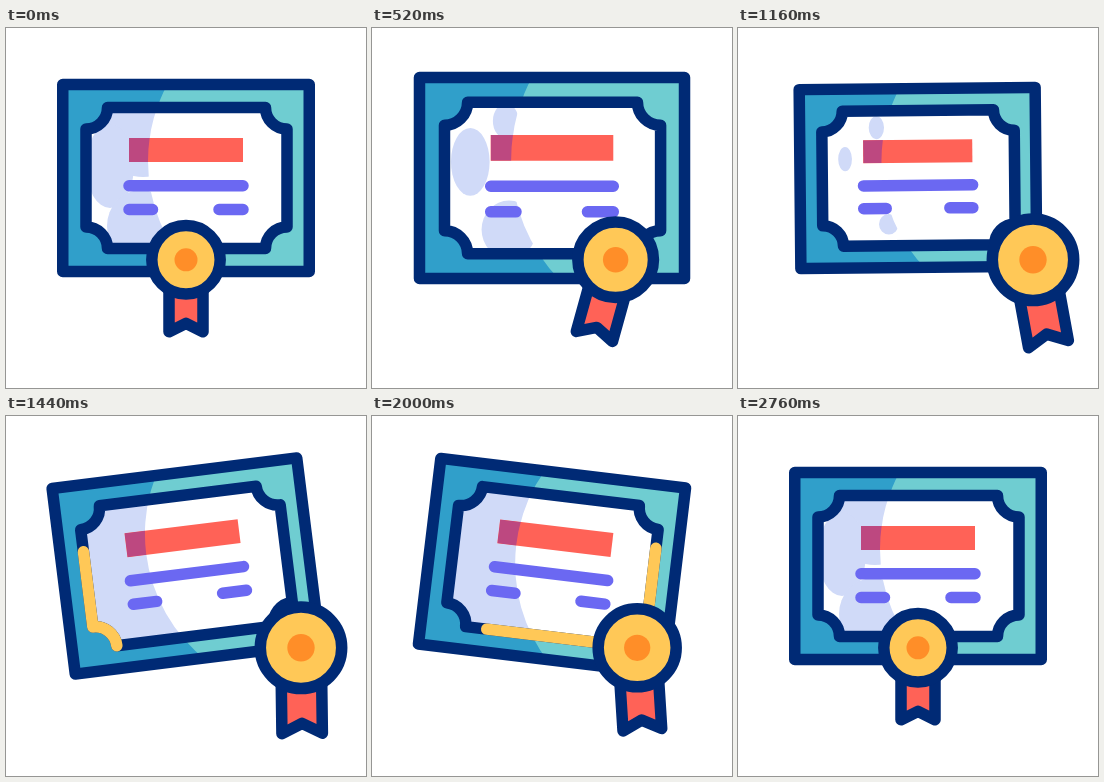
An HTML page with a canvas for the animation above (3000 ms loop, 360x360 px).

```html
<!DOCTYPE html>
<html lang="en">
<head>
<meta charset="utf-8">
<title>Certificate</title>
<style>
html, body { margin: 0; width: 100%; height: 100%; overflow: hidden; background: #fff; }
canvas { display: block; width: 360px; height: 360px; }
</style>
</head>
<body>
<canvas id="stage" width="360" height="360"></canvas>
<script>
const ctx = document.getElementById('stage').getContext('2d');
const LOOP = 3000, STEP = 20, LINE = 11.5, TAU = 2 * Math.PI;
const NAVY = '#002a75', YELLOW = '#ffc857', ORANGE = '#ff8e28', RED = '#ff6257',
      VIOLET = '#6b68f2', SHADOW = '#d0daf8';

// Eases from 0 to 1 between two times (ms).
function ease(t, from, to) {
  const u = Math.min(1, Math.max(0, (t - from) / (to - from)));
  return u * u * (3 - 2 * u);
}

// Eases through key points given as [time, value].
function track(t, ...keys) {
  return keys.slice(1).reduce(
    (value, [time, next], i) => value + (next - keys[i][1]) * ease(t, keys[i][0], time),
    keys[0][1]);
}

const pose = t => ({
  medal: ease(t, 220, 780) - ease(t, 1800, 2400),
  cardScale: track(t, [220, 1], [700, 1.11], [1150, 0.957], [1400, 1]),
  cardTilt: track(t, [1080, 0], [1660, -10.5], [2120, 10.4], [2720, 0]),
  ribbonTilt: track(t, [220, 0], [600, 17.5], [750, 17.5], [1140, -10.5], [1500, 0])
            + track(t, [1800, 0], [2330, -11.3], [2700, 0]),
  trimHead: ease(t, 1207, 2099),
  trimTail: ease(t, 1506, 2398),
  shadeFull: t >= 1300 && t < 2440,
  shadeCover: t < 1300 ? track(t, [220, 1], [440, 0.75], [820, 0.75], [1160, 0.3]) : 1
});

// Paper outline with notched corners, clockwise from the lower left notch.
const NOTCH = 21.5;
function paperPath(left, top, right, bottom) {
  const p = new Path2D();
  [[left, bottom], [left, top], [right, top], [right, bottom]].forEach(([x, y], i) => {
    const angle = i * TAU / 4;
    p.arc(x, y, NOTCH, angle, angle - TAU / 4, true);
  });
  p.closePath();
  return p;
}

function arcSidePath(x, y, r) {
  const p = new Path2D();
  p.moveTo(0, y - r);
  p.arc(x, y, r, -TAU / 4, TAU / 4, true);
  p.lineTo(0, y + r);
  p.closePath();
  return p;
}

function rectPath(x, y, w, h) {
  const p = new Path2D();
  p.rect(x, y, w, h);
  return p;
}

function ellipsePath(x, y, rx, ry = rx) {
  const p = new Path2D();
  p.ellipse(x, y, rx, ry, 0, 0, TAU);
  return p;
}

const FRAME = rectPath(56.75, 56.5, 246.5, 187);
const PAPER = paperPath(80, 79.5, 281, 220.5);
const PAPER_LENGTH = 2 * (201 + 141 - 4 * NOTCH) + TAU * NOTCH;
const HEADING = rectPath(123, 110, 114, 24);
const TEXT_LINES = new Path2D('M123 157.7H237M123 181.5H146.5M213 181.5H237');
const DARK_SIDE = arcSidePath(303, 133, 161);
const RIBBON = new Path2D('M-17 22V72L0 63.5L17 72V22Z');
const DISC = ellipsePath(0, 0, 34.2);
const DISC_CENTRE = ellipsePath(0, 0, 11.5);

function fill(path, color) {
  ctx.fillStyle = color;
  ctx.fill(path);
}

// Line weight stays the same at every scale.
function stroke(path, color) {
  const { a, b } = ctx.getTransform();
  ctx.strokeStyle = color;
  ctx.lineWidth = LINE / Math.hypot(a, b);
  ctx.stroke(path);
}

// Runs draw() inside a moved, turned and scaled space.
function placed(x, y, degrees, scale, draw) {
  ctx.save();
  ctx.translate(x, y);
  ctx.rotate(degrees * TAU / 360);
  ctx.scale(scale, scale);
  draw();
  ctx.restore();
}

function onDarkSide(path, draw) {
  ctx.save();
  ctx.clip(path);
  ctx.clip(DARK_SIDE);
  draw();
  ctx.restore();
}

function fillSplit(path, dark, light) {
  fill(path, light);
  onDarkSide(path, () => fill(path, dark));
}

// The shadow on the paper shrinks to three patches as its cover drops.
function drawShadow({ shadeFull, shadeCover: c }) {
  if (shadeFull) return fill(PAPER, SHADOW);
  const spread = 8 + 40 * c ** 8;
  fill(ellipsePath(137, 97, spread, spread + 4), SHADOW);
  fill(ellipsePath(104, 118 + 20 * c + 8 * (1 - c), 24 * c, 42 * c), SHADOW);
  fill(ellipsePath(155 - 20 * c, 198, 34 * c, 36 * c), SHADOW);
}

function drawTrim({ trimHead, trimTail }) {
  if (trimHead <= trimTail) return;
  ctx.save();
  ctx.setLineDash([(trimHead - trimTail) * PAPER_LENGTH, 2 * PAPER_LENGTH]);
  ctx.lineDashOffset = -trimTail * PAPER_LENGTH;
  stroke(PAPER, YELLOW);
  ctx.restore();
}

function drawCard(now) {
  placed(180, 150, now.cardTilt, now.cardScale, () => {
    ctx.translate(-180, -150);
    fillSplit(FRAME, '#309fca', '#6fcdd1');
    stroke(FRAME, NAVY);
    fill(PAPER, '#fff');
    onDarkSide(PAPER, () => drawShadow(now));
    fillSplit(HEADING, '#bd4880', RED);
    stroke(TEXT_LINES, VIOLET);
    stroke(PAPER, NAVY);
    drawTrim(now);
  });
}

function drawMedal({ medal, ribbonTilt }) {
  placed(180 + 115 * medal, 231.8, 0, 1 + 0.19 * medal, () => {
    placed(0, 0, ribbonTilt, 1, () => {
      fill(RIBBON, RED);
      stroke(RIBBON, NAVY);
    });
    fill(DISC, YELLOW);
    stroke(DISC, NAVY);
    fill(DISC_CENTRE, ORANGE);
  });
}

function render(t) {
  const now = pose(t);
  ctx.fillStyle = '#fff';
  ctx.fillRect(0, 0, 360, 360);
  ctx.lineJoin = ctx.lineCap = 'round';
  drawCard(now);
  drawMedal(now);
}

const start = performance.now();
function tick() {
  const t = (performance.now() - start) % LOOP;
  render(Math.floor(t / STEP) * STEP);
  requestAnimationFrame(tick);
}
tick();
</script>
</body>
</html>
```
